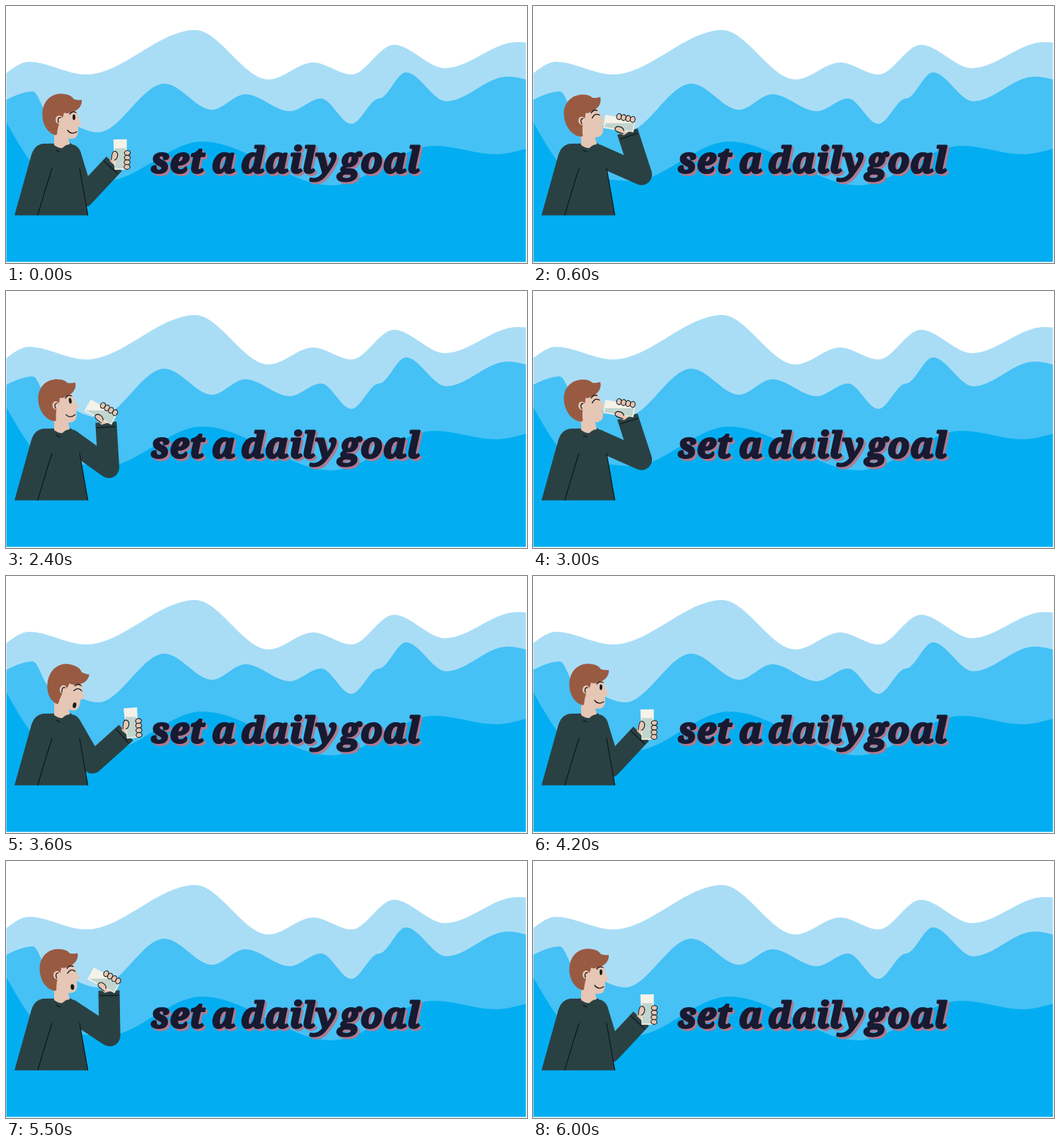
An HTML page for the animation above (6300 ms loop, 736 by 364 pixels).

```html
<!DOCTYPE html>
<html lang="en">
<head>
<meta charset="utf-8">
<title>Set a daily goal</title>
<style>
  html, body { margin: 0; width: 100%; height: 100%; overflow: hidden; background: #fff; }
  svg { display: block; width: 100%; height: 100%; }
  .skin { fill: #e6c6b4; }
  .hair { fill: #995a42; }
  .wool { fill: #2a4143; }
  .sleeve { fill: none; stroke: #2a4143; stroke-width: 30; stroke-linejoin: round; }
  .line { fill: none; stroke: #10191c; stroke-width: 1.3; stroke-linecap: round; stroke-linejoin: round; }
  .finger { fill: #e6c6b4; stroke: #10191c; stroke-width: 1.1; }
  .title { font: italic 900 50px "Noto Serif", "DejaVu Serif", serif; letter-spacing: .02em; stroke-width: 3; stroke-linejoin: round; }
</style>
</head>
<body>
<svg viewBox="0 0 736 364">
  <defs>
    <clipPath id="inside"><path d="M-8 -20H8L7.5 20H-7.5Z"/></clipPath>
    <g id="words">
      <text x="205" y="236">set</text>
      <text x="291" y="236">a</text>
      <text x="332" y="236">daily</text>
      <text x="471" y="236">goal</text>
    </g>
  </defs>

  <g id="waves"></g>

  <g class="title">
    <g fill="#ad7b91" stroke="#ad7b91">
      <use href="#words" x="3" y="3"/>
      <use href="#words" x="1.500" y="1.500"/>
    </g>
    <use href="#words" fill="#171a31" stroke="#171a31"/>
  </g>

  <path class="wool" d="M12 296.5L35 214Q39 197 52 195L92 194.500L99 206L116 296.500Z"/>
  <path class="skin" d="M68 172L87 183L90 196Q80 206 68 197Z"/>
  <path class="line" d="M71 204Q79 210 89 206M65 230Q56 258 45 296"/>

  <g id="head">
    <path class="skin" d="M72 145H99Q101 155 106 167Q106 170 102 170L102 178Q101 188 92 188Q82 188 76 183L68 184Z"/>
    <path class="hair" d="M70 183C56 179 49 162 52 146C56 128 71 122 84 125Q92 126 96 132Q103 134 107 133C108 142 101 149 91 151Q86 153 82 151Q81 158 77 162Q73 170 72 182Z"/>
    <ellipse class="skin" cx="75" cy="161" rx="5" ry="6"/>
    <path class="line" d="M77 158Q72 158 74 165M90 153Q94 148 99 151"/>
    <ellipse id="eyeOpen" cx="96" cy="157.500" rx="1.900" ry="4" fill="#10191c"/>
    <path id="eyeShut" class="line" d="M90 160Q95 153 101 158"/>
    <path id="smile" class="line" d="M87 176Q92 183 100 178"/>
    <ellipse id="gasp" cx="95" cy="180" rx="2.500" ry="4" fill="#10191c"/>
  </g>

  <circle id="shoulder" class="wool" r="15"/>
  <path id="arm" class="sleeve"/>
  <path id="cuff" class="line"/>
  <path class="line" d="M104 230L115.500 296"/>

  <g id="glass">
    <path class="skin" d="M-15 9Q-13 -2 -8 -5L4 14L-2 22Z"/>
    <path d="M-9.500 -21.500H9.500L8.500 21.500H-8.500Z" fill="#f5f2e8"/>
    <g clip-path="url(#inside)"><rect id="drink" x="-40" width="80" height="60" fill="#c1d5ce"/></g>
    <path class="finger" d="M-13 8Q-12 -5 -8 -5Q-3 -4 -4 2Q-5 7 -9 8"/>
    <g id="fingers"></g>
  </g>

  <path d="M0 0V364H736V0H734.500V362.500H.5V0Z" fill="#fff"/>
</svg>

<script>
const el = id => document.getElementById(id);
const set = (id, attrs) => Object.entries(attrs).forEach(([name, v]) => el(id).setAttribute(name, v));
const mix = (a, b, k) => a + (b - a) * k;
const ease = k => { k = Math.max(0, Math.min(1, k)); return k * k * (3 - 2 * k); };
const polar = (degrees, length) => {
  const a = degrees * Math.PI / 180;
  return [Math.cos(a) * length, Math.sin(a) * length];
};

// Each wave swings smoothly between its crests and troughs.
function wavePath(turns) {
  let d = `M${turns[0]}`;
  turns.slice(1).forEach(([x, y], i) => {
    const [px, py] = turns[i], third = (x - px) / 3;
    d += `C${px + third} ${py} ${x - third} ${y} ${x} ${y}`;
  });
  return d + "V364H0Z";
}

const waves = {
  "#a9ddf6": [[-24, 106], [32, 79], [113, 97], [267, 34], [371, 104], [434, 80], [488, 97], [548, 55], [620, 88], [722, 51], [800, 60]],
  "#45c1f5": [[-40, 146], [38, 121], [62, 157], [130, 179], [224, 110], [291, 147], [338, 125], [401, 149],
    [445, 131], [488, 167], [527, 131], [565, 94], [622, 135], [708, 100], [800, 120]],
  "#02aef1": [[-57, 100], [65, 242], [140, 248], [277, 192], [460, 254], [606, 198], [692, 210], [770, 196]]
};
el("waves").innerHTML = Object.entries(waves)
  .map(([fill, turns]) => `<path fill="${fill}" d="${wavePath(turns)}"/>`).join("");
el("fingers").innerHTML = Array.from({ length: 4 }, (_, i) =>
  `<ellipse class="finger" cx="${10 - i * 0.3}" cy="${i * 6.6 - 2}" rx="4.2" ry="3.4"/>`).join("");

// Angles in degrees; reach is the visible length of the upper arm.
const rest = { upper: 73, reach: 62, fore: -47, glass: -1, head: 0 };
const sip = { upper: 24, reach: 68, fore: -108, glass: -81, head: -11.5 };
const offer = { upper: 60, reach: 62, fore: -42, glass: -5, head: 11 };
const SHOULDER = [91, 211], FOREARM = 64;
const SIP_CYCLE = 2100, STEP = 100;

const blend = (a, b, k) =>
  Object.fromEntries(Object.keys(a).map(key => [key, mix(a[key], b[key], ease(k))]));

function poseAt(time) {
  if (time < 1200) return blend(rest, sip, time / 440);
  if (time < 1500) return blend(sip, offer, (time - 1200) / 300);
  return blend(offer, rest, (time - 1500) / 300);
}

const show = (id, visible) => set(id, { visibility: visible ? "visible" : "hidden" });

function draw(time) {
  const { upper, reach, fore, glass, head } = poseAt(time);
  const [sx, sy] = SHOULDER;
  const [dx, dy] = polar(upper, reach), ex = sx + dx, ey = sy + dy;
  const [fx, fy] = polar(fore, FOREARM), wx = ex + fx, wy = ey + fy;
  set("shoulder", { cx: sx, cy: sy });
  set("arm", { d: `M${sx} ${sy}L${ex} ${ey}L${wx} ${wy}` });
  set("cuff", { d: "M-7 -13V13", transform: `translate(${wx} ${wy}) rotate(${fore})` });

  // The wrist is a fixed point of the glass-and-hand group.
  set("glass", { transform: `translate(${wx} ${wy}) rotate(${glass}) translate(9 -13)` });
  set("drink", { transform: `rotate(${-glass})`, y: mix(-9, -1, -glass / 80) });
  set("head", { transform: `rotate(${head} 80 191)` });

  const shut = time >= 400 && time < 1700;
  const gasp = shut && time > 1200;
  show("eyeShut", shut);
  show("eyeOpen", !shut);
  show("gasp", gasp);
  show("smile", !shut);
}

function tick() {
  draw(Math.floor(performance.now() / STEP) * STEP % SIP_CYCLE);
  requestAnimationFrame(tick);
}
tick();
</script>
</body>
</html>
```
